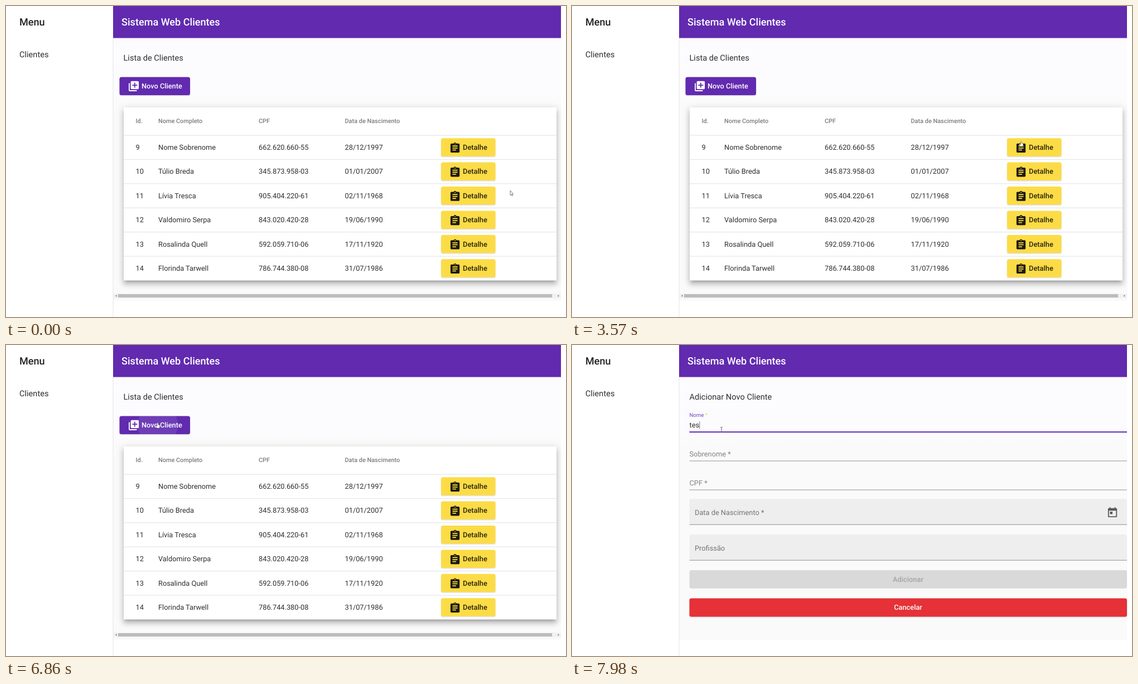
Write an HTML page that moves like this. It is 1004x558 px and loops after 8 s.

```html
<!DOCTYPE html>
<html lang="pt">
<head>
<meta charset="utf-8">
<title>Sistema Web Clientes</title>
<style>
  html, body { margin: 0; width: 100%; height: 100%; overflow: hidden; background: #fff; }
  svg { display: block; width: 100%; height: 100%; }
  text { font: 400 12.8px Roboto, sans-serif; text-rendering: geometricPrecision; }
</style>
</head>
<body>
<svg viewBox="0 0 1004 558">
  <defs>
    <linearGradient id="paper" x1="0" y1="58" x2="0" y2="185" gradientUnits="userSpaceOnUse">
      <stop offset="0" stop-color="#fcfbfe"/>
      <stop offset=".8" stop-color="#fcfbfd"/>
      <stop offset="1" stop-color="#fafafa"/>
    </linearGradient>
    <clipPath id="newButton"><rect x="203.5" y="127.5" width="126.5" height="32.5" rx="3.5"/></clipPath>
    <path id="detail" d="M19 3h-4.18C14.4 1.84 13.3 1 12 1c-1.3 0-2.4.84-2.82 2H5c-1.1 0-2 .9-2 2v14c0 1.1.9 2 2 2h14c1.1 0 2-.9 2-2V5c0-1.1-.9-2-2-2zm-7 0c.55 0 1 .45 1 1s-.45 1-1 1-1-.45-1-1 .45-1 1-1zm2 14H7v-2h7v2zm3-4H7v-2h10v2zm0-4H7V7h10v2z"/>
    <path id="add" d="M4 6H2v14c0 1.1.9 2 2 2h14v-2H4V6zm16-4H8c-1.1 0-2 .9-2 2v12c0 1.1.9 2 2 2h12c1.1 0 2-.9 2-2V4c0-1.1-.9-2-2-2zm-1 9h-4v4h-2v-4H9V9h4V5h2v4h4v2z"/>
    <path id="calendar" d="M19 3h-1V1h-2v2H8V1H6v2H5c-1.1 0-2 .9-2 2v14c0 1.1.9 2 2 2h14c1.1 0 2-.9 2-2V5c0-1.1-.9-2-2-2zm0 16H5V8h14v11zM7 10h5v5H7z"/>
  </defs>
  <g id="shell"></g>
  <g id="list"></g>
  <g id="form"></g>
  <g id="cursor">
    <path id="arrow" d="M0 0V8.6L1.9 6.9L3.2 9.8L4.5 9.2L3.2 6.4H5.6Z" fill="#fff" stroke="#6d6d6d" stroke-width=".9"/>
    <path id="hand" d="M-.9 1Q0-.7.9 1V4L3.8 4.8V7.4L2.8 10H-1.6L-3.6 6.4L-2.7 5.6L-.9 7Z" fill="#fff" stroke="#5a5a5a" stroke-width=".5"/>
    <path id="beam" d="M-2-4.3H-.6L0-3.8L.6-4.3H2M0-3.8V3.8M-2 4.3H-.6L0 3.8L.6 4.3H2" fill="none" stroke="#666" stroke-width="1"/>
  </g>
</svg>
<script>
const LOOP = 8000, STEP = 70, FORM_AT = 6930, FOCUS_AT = 7300, TYPE_AT = 7840;
const PURPLE = '#612aaf', DARK = '#2f2f2f', GREY = '#828282';
const $ = id => document.getElementById(id);

function add(parent, tag, attrs, content = '') {
  const node = document.createElementNS('http://www.w3.org/2000/svg', tag);
  for (const key in attrs) node.setAttribute(key, attrs[key]);
  node.textContent = content;
  return parent.appendChild(node);
}
const rect = (parent, x, y, width, height, fill, more) =>
  add(parent, 'rect', { x, y, width, height, fill, ...more });
const text = (parent, x, y, content, fill = DARK, size = 12.8, weight = 400, anchor = 'start') =>
  add(parent, 'text', { x, y, fill, 'text-anchor': anchor,
    style: `font-size:${size}px;font-weight:${weight}` }, content);
const icon = (parent, name, x, y, fill) =>
  add(parent, 'use', { href: '#' + name, transform: `translate(${x} ${y}) scale(.904)`, fill });

function shadow(parent, x, y, w, h, spread, dy, blur, alpha) {
  rect(parent, x - spread, y - spread + dy, w + 2 * spread, h + 2 * spread, '#000',
    { opacity: alpha, style: `filter:blur(${blur}px)` });
}
function button(parent, x, y, w, h, fill) {
  shadow(parent, x, y, w, h, -.5, 1.2, .9, .2);
  rect(parent, x, y, w, h, fill, { rx: 3.5 });
}

function buildShell(g) {
  rect(g, 192, 58, 803, 471, 'url(#paper)');
  rect(g, 191.5, 57, 1, 501, '#e6e6e6');
  rect(g, 192, 0, 803, 57.5, PURPLE);
  text(g, 24, 35.3, 'Menu', '#222', 18.1, 500);
  text(g, 24, 92.2, 'Clientes', DARK, 14.6);
  text(g, 207, 35.3, 'Sistema Web Clientes', '#fff', 18.1, 500);
}

const clients = [
  ['9', 'Nome Sobrenome', '662.620.660-55', '28/12/1997'],
  ['10', 'Túlio Breda', '345.873.958-03', '01/01/2007'],
  ['11', 'Lívia Tresca', '905.404.220-61', '02/11/1968'],
  ['12', 'Valdomiro Serpa', '843.020.420-28', '19/06/1990'],
  ['13', 'Rosalinda Quell', '592.059.710-06', '17/11/1920'],
  ['14', 'Florinda Tarwell', '786.744.380-08', '31/07/1986']
];
const columns = [232.5, 273, 453, 607.5];
const rowTop = i => 232 + i * 43.4;

function buildList(g) {
  text(g, 210.5, 98.2, 'Lista de Clientes', DARK, 14.6);
  button(g, 203.5, 127.5, 126.5, 32.5, PURPLE);
  const ripple = add(g, 'circle', { id: 'ripple', fill: '#fff', 'clip-path': 'url(#newButton)' });
  ripple.setAttribute('cx', 272);
  ripple.setAttribute('cy', 143);
  icon(g, 'add', 218.2, 133, '#fff');
  text(g, 243, 148.3, 'Novo Cliente', '#fff', 12.75, 500);

  const card = [211, 182, 776, 310.5];
  shadow(g, ...card, -2.7, 4.5, 2.25, .2);
  shadow(g, ...card, .9, 7.2, 4.5, .14);
  shadow(g, ...card, 1.8, 2.7, 6.3, .12);
  rect(g, ...card, '#fff');
  ['Id.', 'Nome Completo', 'CPF', 'Data de Nascimento'].forEach((title, c) =>
    text(g, columns[c], 210.4, title, '#7c7c7c', 10.9, 500));
  clients.forEach((client, i) => {
    const top = rowTop(i);
    rect(g, 211, top - .5, 776, 1, '#e1e1e1');
    client.forEach((value, c) => text(g, columns[c], top + 26, value));
    button(g, 780, top + 5.2, 97.5, 32.5, '#fcdc46');
    icon(g, 'detail', 794.2, top + 12, '#1c1a10');
    text(g, 819, top + 26, 'Detalhe', '#2a2612', 12.85, 500);
  });

  rect(g, 193, 516, 802, 8.5, '#f1f1f1');
  rect(g, 201, 517, 778, 6, '#bcbcbc');
  add(g, 'path', { d: 'M198.5 518.2V521.8L196 520ZM989.5 518.2V521.8L992 520Z', fill: '#777' });
}

function buildForm(g) {
  text(g, 210.5, 98.2, 'Adicionar Novo Cliente', DARK, 14.6);
  [156, 208, 260].forEach(y => rect(g, 210.5, y - .5, 784.5, 1, '#949494'));
  rect(g, 210.5, 155, 784.5, 2.2, '#7038bd', { id: 'underline' });
  const label = text(g, 0, 0, 'Nome');
  label.id = 'label';
  add(label, 'tspan', { id: 'star' }, ' *');
  text(g, 210.5, 147.8, '').id = 'typed';
  rect(g, 228.6, 137, .8, 13.5, '#555', { id: 'caret' });
  text(g, 210.5, 199.6, 'Sobrenome *', GREY);
  text(g, 210.5, 251.6, 'CPF *', GREY);

  [['Data de Nascimento *', 276], ['Profissão', 340]].forEach(([name, y]) => {
    add(g, 'path', { d: `M210.5 ${y + 46}v-42q0-4 4-4h776.5q4 0 4 4v42z`, fill: '#eeeeee' });
    rect(g, 210.5, y + 45.7, 784.5, 1, '#8f8f8f');
    text(g, 220, y + 28.5, name, '#747474');
  });
  icon(g, 'calendar', 958.2, 290, '#5a5a5a');
  rect(g, 210.5, 404, 784.5, 32.8, '#d9d9d9', { rx: 3.5 });
  text(g, 602.5, 425, 'Adicionar', '#a4a4a4', 12.8, 500, 'middle');
  button(g, 210.5, 454.6, 784.5, 32.8, '#e53137');
  text(g, 602.5, 475.4, 'Cancelar', '#fff', 12.8, 500, 'middle');
}

// Pointer path: time, x, y
const path = [
  [0, 904, 331], [3360, 904, 331], [3570, 805, 242], [3640, 742, 176], [3780, 546, 138],
  [5180, 546, 138], [5530, 430, 284], [5950, 247, 236], [6090, 247, 236],
  [6440, 326, 186], [6790, 272, 139], [6860, 272, 139], [6930, 272.5, 143],
  [7000, 272.5, 143], [7280, 268, 152], [LOOP, 268, 152]
];
function pointer(t) {
  const i = Math.max(1, path.findIndex(p => p[0] >= t));
  const [t0, x0, y0] = path[i - 1], [t1, x1, y1] = path[i];
  const p = (t - t0) / (t1 - t0);
  return [x0 + (x1 - x0) * p, y0 + (y1 - y0) * p];
}
const clamp = v => Math.min(1, Math.max(0, v));
const easeOut = p => 1 - (1 - p) ** 3;
const show = (id, on) => $(id).style.display = on ? '' : 'none';
const inside = (x, y, left, top, w, h) => x >= left && x <= left + w && y >= top && y <= top + h;

function draw(time) {
  const t = Math.floor(time / STEP) * STEP;
  const onForm = t >= FORM_AT;
  show('list', !onForm);
  show('form', onForm);

  const [x, y] = pointer(t);
  const overButton = inside(x, y, 203, 127, 127, 33) ||
    clients.some((_, i) => inside(x, y, 780, rowTop(i) + 5, 98, 33));
  $('cursor').setAttribute('transform', `translate(${x} ${y})`);
  show('beam', onForm);
  show('hand', !onForm && overButton);
  show('arrow', !onForm && !overButton);

  const press = clamp((t - 6720) / 140);
  $('ripple').setAttribute('r', 36 * press);
  $('ripple').setAttribute('opacity', .09 * press);

  const focused = t >= FOCUS_AT;
  const lift = easeOut(clamp((t - FOCUS_AT) / 400));
  $('label').setAttribute('transform',
    `translate(210.5 ${147.8 - 18.6 * lift}) scale(${1 - .25 * lift})`);
  $('label').setAttribute('fill', focused ? '#7440c0' : GREY);
  $('star').setAttribute('fill', focused ? '#fbd04c' : GREY);

  const grow = (.5 + .5 * easeOut(clamp((t - FOCUS_AT) / 300))) * 784.5;
  $('underline').setAttribute('x', 602.75 - grow / 2);
  $('underline').setAttribute('width', grow);
  $('underline').setAttribute('opacity', clamp((t - FOCUS_AT) / 100));

  const letters = t < TYPE_AT ? 0 : 1 + Math.floor((t - TYPE_AT) / STEP);
  $('typed').textContent = 'tes'.slice(0, letters);
  $('caret').setAttribute('x', [210.5, 215, 222, 228.4][letters]);
  show('caret', focused);
}

buildShell($('shell'));
buildList($('list'));
buildForm($('form'));
const start = performance.now();
function tick() {
  draw((performance.now() - start) % LOOP);
  requestAnimationFrame(tick);
}
tick();
</script>
</body>
</html>
```
